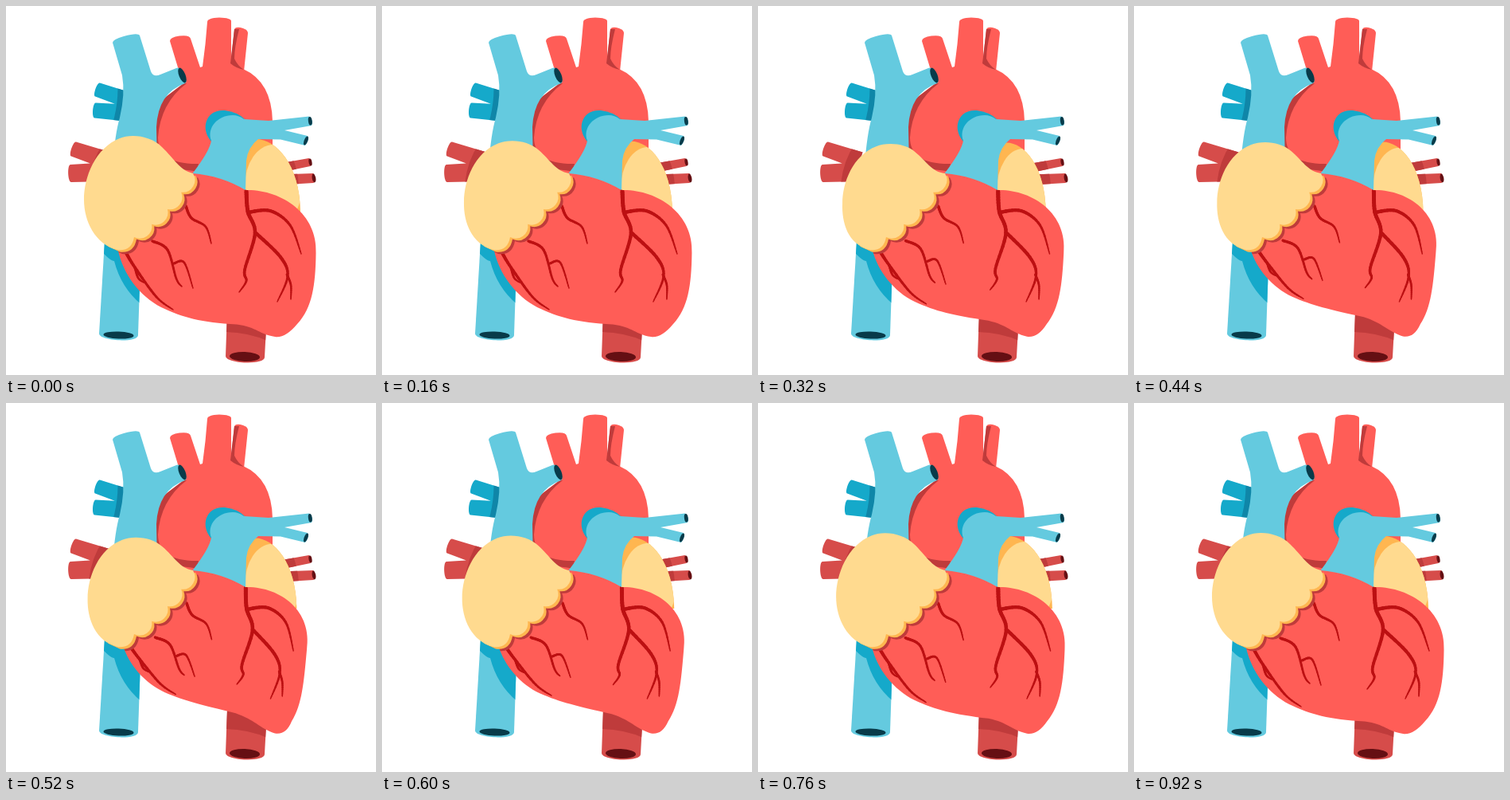
Write an HTML page with a canvas that moves like this. It is 465 px wide and 463 px high and loops after 960 ms.

```html
<!DOCTYPE html>
<html>
<head>
<meta charset="utf-8">
<title>Beating heart</title>
<style>
html, body { margin: 0; width: 100%; height: 100%; overflow: hidden; background: #fff; }
canvas { display: block; }
</style>
</head>
<body>
<canvas id="stage" width="465" height="463"></canvas>
<script>
const ctx = document.getElementById('stage').getContext('2d');
const { min, max, sin, cos, PI } = Math;
const LOOP = 960, STEP = 40;
const SKY = '#64cadf', TEAL = '#15a9ca', DEEP = '#0f86a8', RED = '#ff5d57', DULL = '#d64c4a', SHADE = '#bf3b3b',
      CREAM = '#ffda8f', ORANGE = '#ffb650', VEIN = '#bc1012', NAVY = '#083b4a', WINE = '#650f13';

const lerp = (a, b, k) => a + (b - a) * k;
const clamp = x => min(1, max(0, x));
const smooth = x => { x = clamp(x); return x * x * (3 - 2 * x); };
// Rises from start to peak, falls back until end.
const pulse = (t, start, peak, end) =>
  t < peak ? smooth((t - start) / (peak - start)) : 1 - smooth((t - peak) / (end - peak));

// Moves every point of a path string by the offset that push(x, y) returns.
const warp = (d, push) => d.replace(/([\d.]+) ([\d.]+)/g, (_, px, py) => {
  const x = +px, y = +py, [dx, dy] = push(x, y);
  return (x + dx).toFixed(2) + ' ' + (y + dy).toFixed(2);
});

// Contraction of each chamber, k from 0 to 1.
const squeezeVentricle = k => (x, y) => {
  const u = max(0, (y - 210) / 205);
  const inward = (x > 270 ? 0.2 : 0.1) * u * (1 - u ** 6);
  const lift = max(0, y - 290) * 0.17 * clamp((340 - x) / 90);
  return [k * inward * (270 - x), -k * lift];
};
const squeezeLeft = k => (x, y) => {
  const w = k * clamp(min((235 - x) / 60, (305 - y) / 40));
  return [w * 0.06 * (235 - x), w * 0.075 * (305 - y)];
};
const squeezeRight = k => (x, y) => [k * 0.12 * (300 - x), k * 0.05 * (258 - y)];

function fill(d, color, dx = 0, dy = 0) {
  ctx.save();
  ctx.translate(dx, dy);
  ctx.fillStyle = color;
  ctx.fill(new Path2D(d));
  ctx.restore();
}
function clipped(d, draw) {
  ctx.save();
  ctx.clip(new Path2D(d));
  draw();
  ctx.restore();
}
function oval(x, y, rx, ry, color, tilt = 0) {
  ctx.fillStyle = color;
  ctx.beginPath();
  ctx.ellipse(x, y, rx, ry, tilt * PI / 180, 0, 7);
  ctx.fill();
}
// Vessel from a base to a slightly domed tip, with a width at each end.
function tube(x1, y1, w1, x2, y2, w2) {
  const a = Math.atan2(y2 - y1, x2 - x1);
  const at = (x, y, r, along = 0) =>
    (x - r * sin(a) + along * cos(a)).toFixed(2) + ' ' + (y + r * cos(a) + along * sin(a)).toFixed(2);
  const r = w2 / 2, dome = w2 * 0.2;
  return `M${at(x1, y1, w1 / 2)} L${at(x2, y2, r)} C${at(x2, y2, r, dome)} ${at(x2, y2, -r, dome)} ` +
         `${at(x2, y2, -r)} L${at(x1, y1, -w1 / 2)} Z`;
}
// Tapered smooth curve through the points.
function vein(points, width) {
  const p = points.split(' ').map(Number), last = p.length / 2 - 1, sub = 8, total = last * sub;
  const at = (i, c) => p[2 * min(last, max(0, i)) + c];
  const spline = (i, u, c) => {
    const a = at(i - 1, c), b = at(i, c), d = at(i + 1, c), e = at(i + 2, c);
    return b + u * (d - a + u * (2 * a - 5 * b + 4 * d - e + u * (3 * (b - d) + e - a))) / 2;
  };
  ctx.strokeStyle = VEIN;
  ctx.lineCap = 'round';
  let x = p[0], y = p[1];
  for (let s = 1; s <= total; s++) {
    const i = Math.floor(s / sub), u = s / sub - i;
    ctx.lineWidth = lerp(width, 1.5, (s / total) ** 2);
    ctx.beginPath();
    ctx.moveTo(x, y);
    ctx.lineTo(x = spline(i, u, 0), y = spline(i, u, 1));
    ctx.stroke();
  }
}

// Scalloped rim: arcs between points spaced along a quadratic curve.
function scallops(count) {
  const bend = (a, b, c, t) => lerp(lerp(a, b, t), lerp(b, c, t), t);
  let d = ' Q158 308 161 290';
  for (let i = 1; i <= count; i++) {
    const t = i / count;
    d += ` A15.5 15.5 0 0 0 ${bend(161, 208, 235, t)} ${bend(290, 260, 210, t)}`;
  }
  return d + ' Z';
}

const AORTA = 'M206 44 Q206 39 218 37.5 Q231 36 232 41 L244 77 L247 76 Q251 48 253 20 Q253 15 268 14.5 Q283 15 283 19 L283 75 L298 79 Q334 95 335 145 L335 185 L240 210 L180 200 L180 130 L222 98 L216 77 Z';
const AORTA_BRANCH = 'M287 29 Q289 25 298 28 Q304 30 304 34 L299 82 L282 75 Z';
const CAVA = 'M134 46 Q134 42 148 38 Q166 33 168 37 L182 82 Q185 90 194 86 L214 78 Q218 76 222 83 Q229 95 225 97 Q191 109 189 152 L190 200 L134 200 Q137 160 143 140 Q150 110 146 87 Z';
const TRUNK = 'M234.5 210 Q256 182 258 169 C252 153 266 137 285 137 Q292 137 299 142 L330 144 L381 138.5 Q387 144 384 150 L350 156 L379 163 Q381 169 376 175 L345 167.5 L317 167 Q304 177 302 194 L301 231 Q271 213 234.5 210 Z';
const LEFT_ATRIUM = 'M235 210 C218 206 211 191 196 177 C182 163 158 160 143 166 C112 178 98 215 98 243 C98 270 112 299 140 306';
const RIGHT_ATRIUM = 'M296 234 Q296 180 313 167 C338 166 369 197 370 258 L330 258 Z';
const VENTRICLE = 'M150 300 L220 205 Q270 210 302 231 C345 230 392 260 389.5 310 C389 350 385 379 366 399 Q351 417 338 415 C318 412 316 403 290 399.5 C245 397 222 391 195 378 C168 364 147 336 141 307 Z';
const LOBES = scallops(4);
const RIM = 'M125 299 L140 306' + LOBES;

const LOWER_CAVA = tube(147, 295, 46, 141.5, 412, 49);
const DESCENDING = tube(303, 385, 50, 300.5, 440, 49);
const TEAL_VEINS = tube(150, 117, 20, 115, 105, 18) + tube(150, 134, 21, 112, 131, 19);
const LEFT_VEINS = tube(128, 194, 22, 85, 179.5, 19) + tube(130, 208, 24, 81.5, 210, 22);
const RIGHT_VEINS = tube(345, 203, 11, 381.5, 196, 10) + tube(345, 218, 13, 386, 216, 12);

const VEINS = [
  ['302 232 304 258 313 285 300 331 302 345 293 359', 5],
  ['304 259 332 257 357 275 371 311', 4.5],
  ['313 284 345 315 354 339 341 371', 4.5],
  ['353 337 358 350 358 368', 3],
  ['226 251 233 266 251 277 258 298', 3.5],
  ['184 295 203 306 214 342 221 352', 3.5],
  ['211 323 224 322 235 354', 3],
  ['151 310 162 328 189 365 210 381', 4],
  ['162 328 166 341 173 347', 3]
];

function vessels() {
  fill(TEAL_VEINS, TEAL);
  clipped(TEAL_VEINS, () => fill(CAVA, DEEP, -7));
  fill(LEFT_VEINS, DULL);
  clipped(LEFT_VEINS, () => fill('M121 174 Q107 195 104 224 L140 224 L140 174 Z', SHADE));

  fill(AORTA, RED);
  clipped(AORTA, () => {
    fill('M227 97 Q194 122 191 165 L180 165 L180 97 Z', SHADE);
    fill('M180 165 L191 165 Q191 199 242 198 L238 214 L180 210 Z', SHADE);
  });
  fill(AORTA_BRANCH, RED);
  fill('M287 29 L293 29 Q287 52 287 66 Q291 75 299 80 Q289 78 282 72 Z', SHADE);

  fill(CAVA, SKY);
  oval(221.5, 87, 4, 10, NAVY, -22);
  fill(LOWER_CAVA, SKY);
  clipped(LOWER_CAVA, () => fill('M115 302 Q130 320 136 320 Q145 355 172 376 L180 295 L115 290 Z', TEAL));
  oval(141.5, 413, 19, 4.5, NAVY, 2);

  fill(DESCENDING, DULL);
  clipped(DESCENDING, () => fill('M270 409 Q305 409 330 421 L330 380 L270 380 Z', SHADE));
  oval(300, 440, 19, 6, WINE, 2);
  fill(RIGHT_VEINS, DULL);
  clipped(RIGHT_VEINS, () => fill('M340 185 L358 185 Q367 205 368 226 L340 226 Z', SHADE));
  oval(382.5, 196, 2, 4.5, WINE, -10);
  oval(387, 216, 2.3, 5.5, WINE, -10);
}

function draw(t) {
  const a = pulse(t, 0, 280, 800), v = pulse(t, 140, 520, 920);
  const rightAtrium = warp(RIGHT_ATRIUM, squeezeRight(a));
  const beat = squeezeVentricle(v);
  const ventricle = warp(VENTRICLE, beat);

  ctx.fillStyle = '#fff';
  ctx.fillRect(0, 0, 465, 463);
  vessels();

  fill(rightAtrium, ORANGE);
  clipped(rightAtrium, () => oval(336 - 3 * a, 226 + 5 * a, 36 - 3 * a, 52, CREAM));

  fill(ventricle, RED);
  clipped(ventricle, () => {
    for (const [points, width] of VEINS) vein(warp(points, beat), width);
    fill(RIM, SHADE, 6, 5);
  });
  fill(RIM, ORANGE, 3, 2.5);
  fill(warp(LEFT_ATRIUM, squeezeLeft(a)) + LOBES, CREAM);

  fill('M258 170 C243 153 252 129 275 131 Q291 133 300 142 L280 160 Z', TEAL);
  fill(TRUNK, SKY);
  oval(382.3, 144.3, 2.4, 5.3, NAVY, -8);
  oval(377, 169, 2.3, 5.8, NAVY, 22);
}

function tick(now) {
  draw(Math.floor(now % LOOP / STEP) * STEP);
  requestAnimationFrame(tick);
}
tick(performance.now());
</script>
</body>
</html>
```
